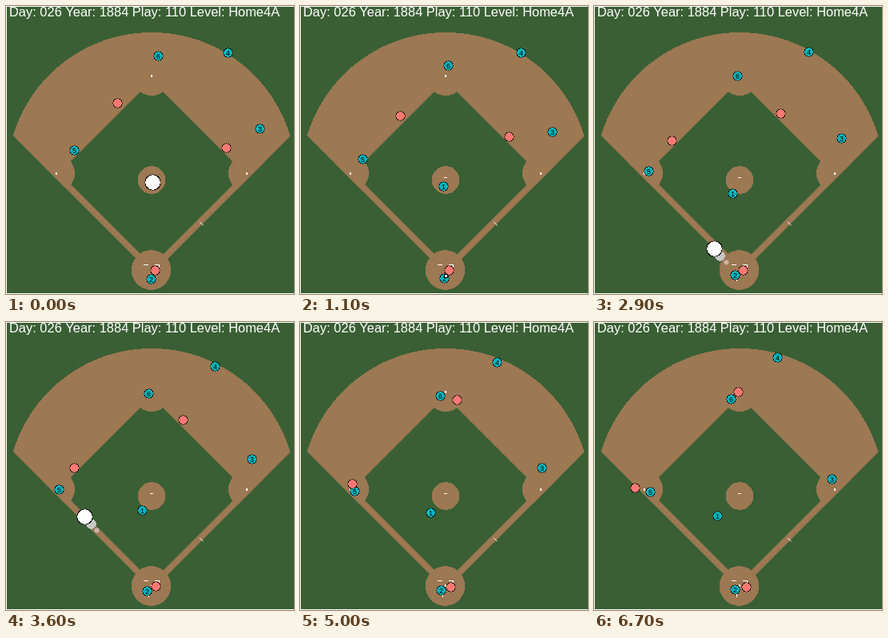
Animation, 360 px wide and 360 px high, one loop 6.8 s. Source, as an HTML page with a canvas:

```html
<!DOCTYPE html>
<html lang="en">
<head>
<meta charset="utf-8">
<title>Ball field</title>
<style>
html, body { margin: 0; width: 100%; height: 100%; overflow: hidden; background: #fff; }
canvas { display: block; }
</style>
</head>
<body>
<canvas id="stage" width="360" height="360"></canvas>
<script>
const ctx = document.getElementById('stage').getContext('2d');
const LOOP = 6800, STEP = 100, LAST = LOOP - STEP;
const CAUGHT = 1030, THROWN = 2500, FIELDED = 4000;
const GRASS = '#3a5f34', DIRT = '#9c7853', TEAL = '#00b4be', RED = '#ff7873';
const FONT = '"Liberation Sans", Arial, sans-serif';

// Each player runs to a turning point, then drifts evenly to the end.
// ease below 1 starts fast, above 1 starts slowly.
const player = (label, from, via, to, ease = 1, turn = 2900) =>
  ({ label, from, via, to, ease, turn });

const players = [
  player('1', [183, 220], [173, 234], [154, 242]),
  player('2', [181, 341], [176, 336], [176, 334], 2.3),
  player('3', [317, 153], [309, 165], [297, 196], 1.2),
  player('4', [277, 58], [268, 57], [229, 44], 2.3),
  player('5', [85, 180], [66, 209], [70, 212], 0.95, 3200),
  player('6', [190, 62], [179, 87], [171, 96], 0.8),
  player('', [139, 121], [68, 201], [51, 207], 1.13, 4600),
  player('', [275, 177], [191, 92], [180, 87], 1.13, 5300),
  player('', [186, 330], [186, 330], [190, 331])
];

const lerp = (a, b, u) => a + (b - a) * u;
const mix = (p, q, u) => [lerp(p[0], q[0], u), lerp(p[1], q[1], u)];
const snap = p => p.map(v => Math.round(v) + 0.5);

function place({ from, via, to, ease, turn }, t) {
  return snap(t < turn
    ? mix(from, via, (t / turn) ** ease)
    : mix(via, to, (t - turn) / (LAST - turn)));
}

function rect(fill, ...box) {
  ctx.fillStyle = fill;
  ctx.fillRect(...box);
}

// Hard-edged disc, filled row by row
function disc(x, y, r, fill) {
  for (let row = Math.floor(y - r); row <= y + r; row++) {
    const rest = r * r - (row + 0.5 - y) ** 2;
    if (rest < 0) continue;
    const half = Math.sqrt(rest);
    const left = Math.ceil(x - half - 0.5), right = Math.floor(x + half - 0.5);
    rect(fill, left, row, right - left + 1, 1);
  }
}

function token(x, y, r, fill) {
  disc(x, y, r, '#000');
  disc(x, y, r - 0.9, fill);
}

function trace(...points) {
  ctx.beginPath();
  for (const p of points) ctx.lineTo(...p);
}

function polygon(fill, ...points) {
  trace(...points);
  ctx.fillStyle = fill;
  ctx.fill();
}

function write(text, x, y, size, align, fill) {
  ctx.font = `${size}px ${FONT}`;
  ctx.textAlign = align;
  ctx.fillStyle = fill;
  ctx.fillText(text, x, y);
}

function drawField() {
  rect('#fff', 0, 0, 360, 360);
  rect(GRASS, 1, 1, 359, 358);

  // Everything inside the foul lines
  ctx.save();
  trace([182.5, 335.5], [-153, 0], [518, 0]);
  ctx.clip();
  disc(182, 213.5, 180.5, DIRT);
  polygon(DIRT, [182.5, 335.5], [9, 162], [355.5, 162]);
  polygon(GRASS, [182, 93], [66.5, 208.5], [182.5, 324.5], [298, 209]);
  disc(182, 88, 24, DIRT);
  for (const x of [63, 301]) disc(x, 209, 23, DIRT);
  ctx.restore();

  disc(182, 217.5, 17.3, DIRT);
  disc(181.5, 330, 24.7, DIRT);

  for (const [x, y] of [[182, 87], [63, 209], [301, 209], [182, 329]])
    rect('#fff', x - 1, y - 1, 2, 3);
  rect('#fff', 180, 214, 4, 1);
  for (const x of [172, 186]) rect('#fff', x, 323, 6, 1);
  rect('#fff', 191, 323, 1, 11);
  rect('#fff', 178, 340, 1, 4);
  trace([242, 270], [246.5, 274]);
  ctx.strokeStyle = '#fff';
  ctx.stroke();

  write('Day: 026 Year: 1884 Play: 110 Level: Home4A', 4, 13, 16.45, 'left', '#fff');
}

function drawPlayer(p, t) {
  const [x, y] = place(p, t);
  token(x, y, 6, p.label ? TEAL : RED);
  write(p.label, x, y + 3, 9, 'center', '#000');
}

// A flying ball leaves two smaller ghosts behind it
function drawFlight(t, start, end, from, to) {
  const at = s => snap(mix(from, to, (s - start) / (end - start)));
  if (t - 2 * STEP >= start) disc(...at(t - 2 * STEP), 3, '#c8b4a8');
  if (t - STEP >= start) disc(...at(t - STEP), 6.3, '#c8c8c8');
  token(...at(t), 10, '#fff');
}

function drawBall(t) {
  const plate = [182, 337], release = [179.5, 337.5];
  if (t < CAUGHT) drawFlight(t, 0, CAUGHT, [183, 220], plate);
  else if (t < THROWN) {
    const u = (t - CAUGHT) / (THROWN - CAUGHT);
    token(...snap(mix(plate, release, u)), lerp(2.5, 10, u), '#fff');
  } else if (t < FIELDED) drawFlight(t, THROWN, FIELDED, release, [68.5, 208.5]);
}

function frame(now) {
  const t = Math.floor(now % LOOP / STEP) * STEP;
  drawField();
  for (const p of players) drawPlayer(p, t);
  drawBall(t);
  requestAnimationFrame(frame);
}
frame(0);
</script>
</body>
</html>
```
